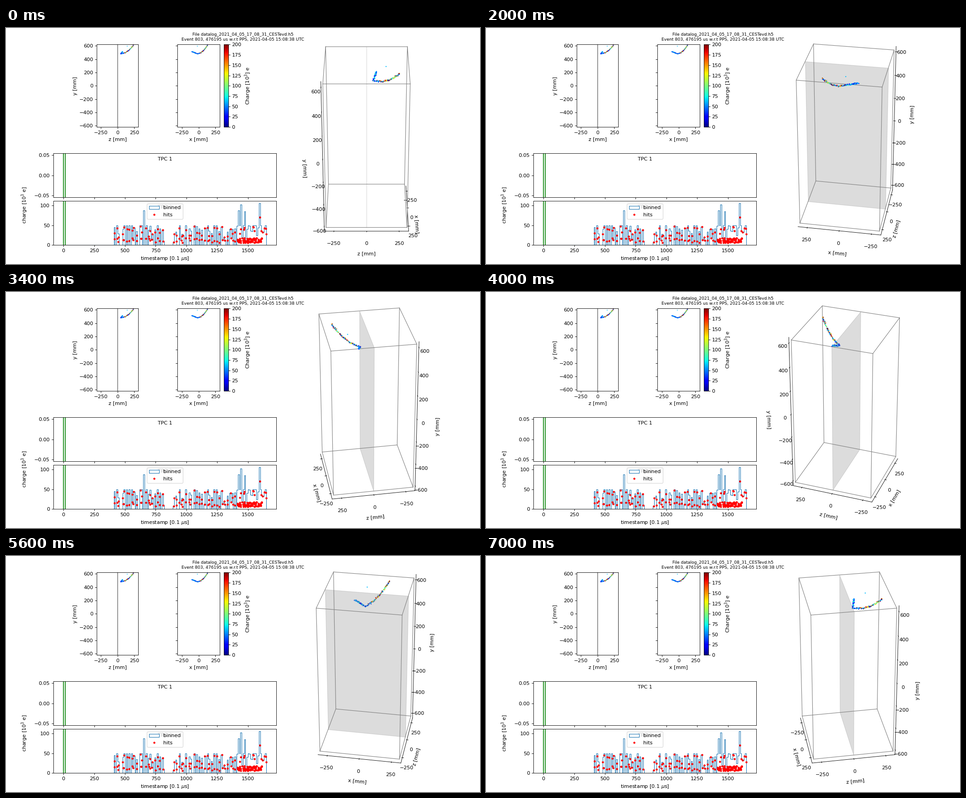
These frames come from a looping animation (1040x520 px, 7.2 s). A matplotlib script:

```python
import numpy as np
import matplotlib.pyplot as plt
from matplotlib.animation import FuncAnimation
from mpl_toolkits.mplot3d.art3d import Poly3DCollection

W, H, DPI = 1040, 520, 80
FRAMES, INTERVAL = 36, 200
X = Z = 310  # half sizes of the detector in mm
Y = 620

plt.rcParams.update({"font.family": "DejaVu Sans", "font.size": 10})
rng = np.random.default_rng(803)
fig = plt.figure(figsize=(W / DPI, H / DPI), dpi=DPI, facecolor="white")


def add_axes(left, top, right, bottom, **kwargs):
    """Axes placed by pixel edges, measured from the top left corner."""
    box = [left / W, 1 - bottom / H, (right - left) / W, (bottom - top) / H]
    return fig.add_axes(box, **kwargs)


def sample_path(nodes, count, jitter=2.5):
    """Random points scattered about a polyline of (x, y, z) nodes."""
    nodes = np.array(nodes, float)
    steps = np.linalg.norm(np.diff(nodes, axis=0), axis=1)
    along = np.r_[0, np.cumsum(steps)]
    u = rng.uniform(0, along[-1], count)
    points = np.column_stack([np.interp(u, along, col) for col in nodes.T])
    return points + rng.normal(0, jitter, points.shape)


def make_track(short_count=50, long_count=110):
    """Two arms from one vertex and a lone hit, with their charges."""
    vertex = (-17, 478, 48)
    short = sample_path([(-106, 513, 74), (-65, 501, 67), vertex], short_count)
    long = sample_path([vertex, (37, 500, 120), (78, 533, 172),
                        (126, 600, 230), (132, 614, 241)], long_count)
    charge = np.r_[rng.uniform(15, 85, short_count),
                   np.clip(rng.gamma(1.5, 58, long_count), 5, 200), 62]
    return np.vstack([short, long, (-20, 595, 144)]), charge


def make_hits():
    """Sparse pairs of a strong and a weak hit, then a dense late burst."""
    early = np.arange(411, 1400, 21) + rng.uniform(-8, 8, 48)
    early = early[abs(early - 868) > 30]
    late = rng.uniform(1415, 1615, 75)
    strong = np.r_[early, rng.uniform(1415, 1650, 12)]
    weak = np.r_[early + rng.normal(0, 3, early.size), late]
    charge = np.r_[rng.uniform(20, 48, strong.size), rng.uniform(6, 18, weak.size)]
    return np.r_[strong, weak, 1598], np.r_[charge, 70]


def bin_hits(time, charge):
    edges = np.linspace(0, 1650, 166)
    heights = np.histogram(time, edges, weights=charge)[0].clip(max=50)
    for t, height in ((650, 88), (1424, 88), (1443, 102), (1473, 85), (1598, 106)):
        heights[t // 10] = height
    return edges, heights


fig.suptitle("File datalog_2021_04_05_17_08_31_CESTevd.h5\n"
             "Event 803, 476195 us w.r.t PPS, 2021-04-05 15:08:38 UTC",
             fontsize="small")

# Side projections
points, track_charge = make_track()
colour = dict(c=track_charge, cmap="jet", vmin=0, vmax=200)
ax_z = add_axes(199.3, 36.4, 290.2, 218.2)
ax_x = add_axes(376.2, 36.4, 469.2, 218.2)
for ax, column, half, name in ((ax_z, 2, 310, "z"), (ax_x, 0, 316, "x")):
    dots = ax.scatter(points[:, column], points[:, 1], s=1, linewidths=0.5, **colour)
    ax.set(xlim=(-half, half), ylim=(-Y, Y), xlabel=f"{name} [mm]",
           xticks=[-250, 0, 250], yticks=range(-600, 601, 200))
ax_z.axvline(0, color="gray")
ax_z.set_ylabel("y [mm]")
ax_x.tick_params(labelleft=False)
fig.colorbar(dots, cax=add_axes(478, 36.4, 487.6, 218.2),
             ticks=range(0, 201, 25), label="Charge [$10^3$] e")

# Charge against time
ax_tpc1 = add_axes(104, 276, 593.3, 373.1)
ax_tpc2 = add_axes(104, 381.3, 593.3, 478.4)
time, charge = make_hits()
edges, heights = bin_hits(time, charge)
ax_tpc2.hist(edges[:-1], edges, weights=heights, histtype="step", label="binned")
ax_tpc2.plot(time, charge, "r.", label="hits")
for number, ax in enumerate((ax_tpc1, ax_tpc2), 1):
    for t in (0, 15):
        ax.axvline(t, color="green")
    ax.text(0.5, 0.915, f"TPC {number}", transform=ax.transAxes, ha="center", va="top")
    ax.set(xlim=(-82.5, 1732.5), xticks=range(0, 1501, 250))
ax_tpc1.set(ylim=(-0.055, 0.055), yticks=[-0.05, 0, 0.05])
ax_tpc2.set(ylim=(0, 111.3), yticks=[0, 50, 100], xlabel=r"timestamp [0.1 $\mu$s]")
ax_tpc2.legend(loc="upper center")
fig.text(41 / W, 1 - 390 / H, "charge [$10^3$ e]", rotation=90,
         ha="center", va="center")

# Rotating view, with the detector's y axis pointing up
ax3d = add_axes(564, 26.3, 1006, 468.3, projection="3d")
ax3d.patch.set_visible(False)
ax3d.scatter(points[:, 0], points[:, 2], points[:, 1], s=1, linewidths=1.1,
             depthshade=False, **colour)
for a in (-1, 1):
    for b in (-1, 1):
        for line in (([-X, X], [a * Z] * 2, [b * Y] * 2),
                     ([a * X] * 2, [-Z, Z], [b * Y] * 2),
                     ([a * X] * 2, [b * Z] * 2, [-Y, Y])):
            ax3d.plot(*line, color="gray", lw=1)
cathode = [(-X, 0, -Y), (X, 0, -Y), (X, 0, Y), (-X, 0, Y)]
shade = [(0.5, 0.5, 0.5, 0.27)]
ax3d.add_collection3d(Poly3DCollection([cathode], facecolors=shade,
                                       edgecolors=shade, linewidths=1))
margin = 25 / 24
ax3d.set(xticks=[-250, 0, 250], yticks=[-250, 0, 250], zticks=range(-600, 601, 200),
         xlabel="x [mm]", ylabel="z [mm]",
         xlim=(-X * margin, X * margin), ylim=(-Z * margin, Z * margin),
         zlim=(-Y * margin, Y * margin))
ax3d.set_zlabel("y [mm]", labelpad=20)
ax3d.set_box_aspect((1, 1, 2))
ax3d.grid(False)
for axis in (ax3d.xaxis, ax3d.yaxis, ax3d.zaxis):
    axis.pane.set_visible(False)


def update(frame):
    # A tiny offset keeps the axis placement stable in edge-on views.
    ax3d.view_init(elev=30, azim=frame * 360 / FRAMES + 1e-4)
    return []


anim = FuncAnimation(fig, update, frames=FRAMES, interval=INTERVAL,
                     init_func=lambda: update(0), repeat=True, repeat_delay=0)
plt.show()
```
